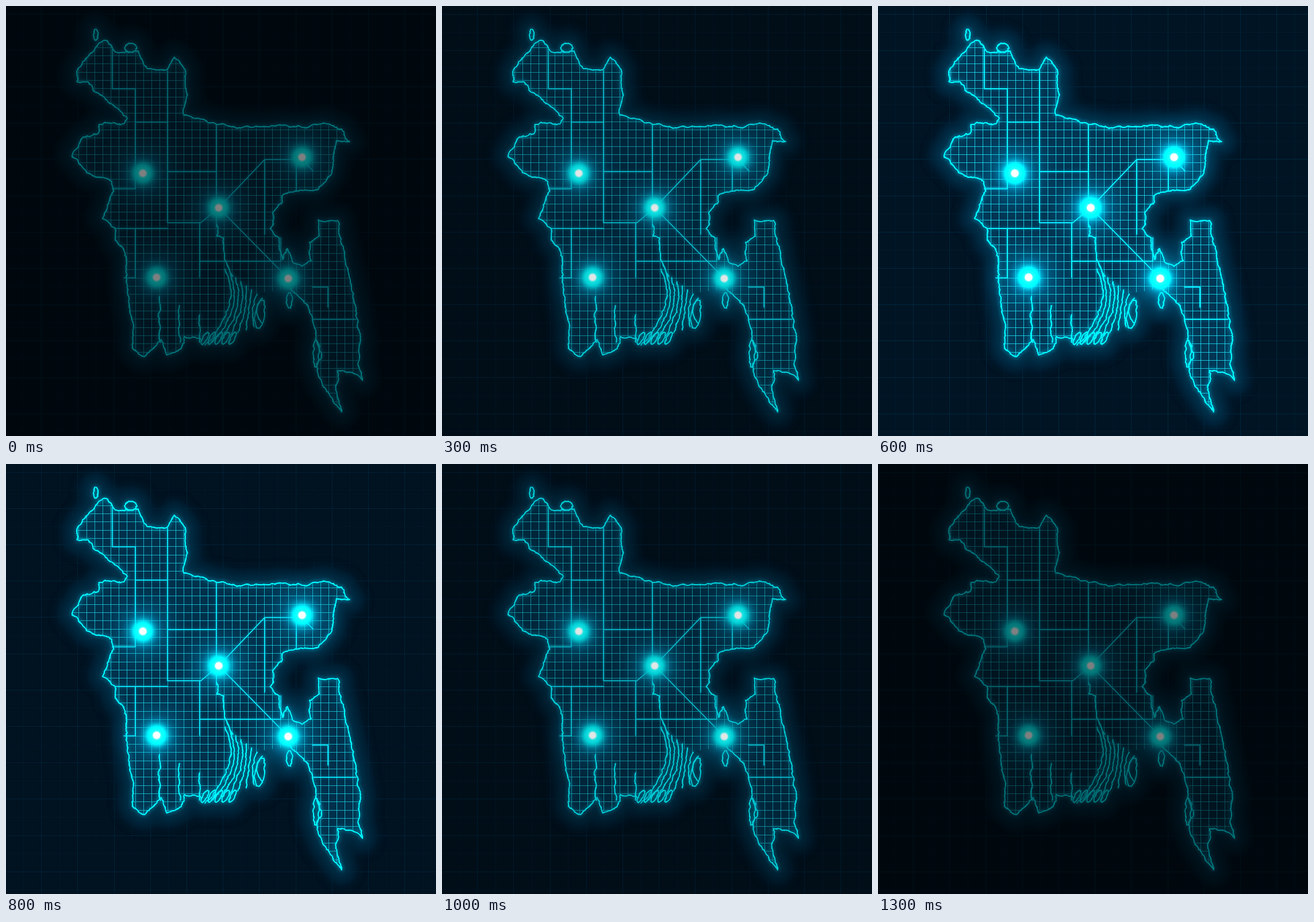
These frames come from a looping animation (748x748 px, 1.4 s). An HTML page with a canvas:

```html
<!DOCTYPE html>
<html lang="en">
<head>
<meta charset="utf-8">
<title>Glowing map</title>
<style>
  html, body { margin: 0; width: 100%; height: 100%; overflow: hidden; background: #000; }
  canvas { display: block; width: 748px; height: 748px; animation: pulse 1400ms infinite; }
  /* Six steps up, a short hold, six steps down */
  @keyframes pulse {
    0% { filter: brightness(.5); animation-timing-function: steps(6, end); }
    42.85% { filter: brightness(1.3); animation-timing-function: step-end; }
    57.14% { filter: brightness(1.3); animation-timing-function: steps(6, start); }
    100% { filter: brightness(.5); }
  }
</style>
</head>
<body>
<canvas id="map" width="748" height="748"></canvas>
<script>
const SIZE = 748;
const ctx = document.getElementById('map').getContext('2d');
const points = text => text.trim().split(/\s+/).map(p => p.split(',').map(Number));
const mix = (a, b, t) => a + (b - a) * t;

let seed = 7;
const random = () => (seed = seed * 16807 % 2147483647) / 2147483647;
const shake = amount => (random() - .5) * amount;

// Key points of the coast; the small bays come from roughen()
const east = points(`163,64 175,60 190,80 230,78 246,109 279,111 293,89 312,111 315,155 309,189
  366,206 425,211 500,210 560,205 584,214 598,236 575,234 567,290 543,319 503,322 482,328
  481,341 464,361 460,388 475,403 481,441 489,422 498,445 515,453 531,443 528,411 545,400
  543,372 577,373 588,425 604,500 617,580 613,625 620,651 606,640 577,634 576,680 584,706
  558,670 541,628 549,610 537,560 526,525 495,491`);
const shore = points('430,501 393,480 388,548 340,578');
const west = points(`340,580 310,575 305,596 280,607 270,580 262,590 241,610 222,598 221,550
  209,480 207,430 190,406 190,387 168,370 187,322 184,305 140,290 115,260 134,228 160,222
  162,206 205,205 211,195 186,172 152,147 143,132 124,132 124,112 145,84 163,64`);
const river = points('366,380 367,400 379,404 380,440 395,470');
const nodes = points('238,291 515,263 370,351 262,472 491,474');

const borders = new Path2D(`M185 76V144H225V318H185M281 112V377H339L370 351L450 267H515L534 287
  M366 206V385M281 288H366M225 202H281M505 267V322M450 267V397M190 387H281M337 377V472
  M337 444H478V403M370 351L491 474M205 473H225V387M533 489H560V524M533 545H609`);

// Midpoint displacement: halves each edge and pushes the middle sideways.
function roughen(list) {
  const out = [list[0]];
  const split = ([ax, ay], [bx, by]) => {
    const length = Math.hypot(bx - ax, by - ay);
    if (length < 5) return out.push([bx, by]);
    const push = shake(Math.min(5, length * .28)) / length;
    const mid = [(ax + bx) / 2 - (by - ay) * push, (ay + by) / 2 + (bx - ax) * push];
    split([ax, ay], mid);
    split(mid, [bx, by]);
  };
  for (let i = 1; i < list.length; i++) split(list[i - 1], list[i]);
  return out;
}

function trace(list, path = new Path2D()) {
  list.forEach(([x, y], i) => i ? path.lineTo(x, y) : path.moveTo(x, y));
  return path;
}

function oval(cx, cy, rx, ry, tilt = 0) {
  return Array.from({ length: 11 }, (_, i) => {
    const a = i * Math.PI / 5, x = rx * Math.cos(a), y = ry * Math.sin(a);
    return [cx + x * Math.cos(tilt) - y * Math.sin(tilt), cy + x * Math.sin(tilt) + y * Math.cos(tilt)];
  });
}

// One channel of the river fan: t = 0 is the western arm, t = 1 the eastern.
function strand(t) {
  const x0 = mix(381, 446, t), y0 = mix(458, 508, t);
  const x1 = mix(346, 446, t), y1 = mix(590, 552, t);
  const bow = mix(60, -25, t);
  return Array.from({ length: 9 }, (_, i) => {
    const s = i / 8;
    return [mix(x0, x1, s) + bow * s * (1 - s) * 1.6, mix(y0, y1, s)];
  });
}

function stroke(path, color, width, blur = 0) {
  ctx.filter = blur ? `blur(${blur}px)` : 'none';
  ctx.strokeStyle = color;
  ctx.lineWidth = width;
  ctx.stroke(path);
  ctx.filter = 'none';
}

function grid(x0, y0, dx, dy, color) {
  ctx.fillStyle = color;
  for (let x = x0; x < SIZE; x += dx) ctx.fillRect(Math.floor(x), 0, 1, SIZE);
  for (let y = y0; y < SIZE; y += dy) ctx.fillRect(0, Math.floor(y), SIZE, 1);
}

function glow([x, y], r, stops) {
  const fill = ctx.createRadialGradient(x, y, 0, x, y, r);
  stops.forEach(([d, c]) => fill.addColorStop(d / r, `rgba(${c})`));
  ctx.fillStyle = fill;
  ctx.fillRect(x - r, y - r, 2 * r, 2 * r);
}

function sketch(line) {
  stroke(trace(line), 'rgba(0,150,180,.5)', 5, 3);
  stroke(trace(line), 'rgb(0,245,253)', 1.6);
  stroke(trace(line.map(([x, y]) => [x + shake(2.6), y + shake(2.6)])), 'rgba(0,235,245,.85)', 1.1);
}

const coast = [east, west].map(roughen);
const land = trace([...coast[0], ...shore, ...coast[1]]);
land.closePath();

const water = [river, oval(156, 50, 4, 10), oval(217, 73, 11, 8), oval(493, 512, 5, 14),
  oval(539, 605, 5, 24), oval(442, 536, 8, 26, .15)];
for (let i = 0; i < 8; i++) water.push(strand(i / 7));
for (let i = 0; i < 5; i++) water.push(oval(346 + 12 * i, 578, 4, 12, .5));
for (let i = 0; i < 3; i++) water.push([[267 + 35 * i, 505 + 16 * i], [269 + 34 * i, 585]]);
const channels = water.map(roughen);

ctx.lineJoin = ctx.lineCap = 'round';
ctx.fillStyle = '#010f1b';
ctx.fillRect(0, 0, SIZE, SIZE);
grid(-1.5, 14, 31.6, 31.6, 'rgba(0,70,105,.1)');
grid(-1.5, 14, 63.2, 63.2, 'rgba(0,80,115,.17)');

// Halo around the coast
const rim = new Path2D(land);
channels.forEach(c => trace(c, rim));
stroke(rim, 'rgba(2,32,51,.8)', 56, 7);
stroke(rim, 'rgba(2,52,76,.6)', 24, 8);
ctx.fillStyle = '#022940';
ctx.fill(land);

// Wide blue haze below the grid
nodes.forEach(n => glow(n, 80, [[0, '0,125,165,.6'], [30, '0,115,155,.42'], [55, '0,95,135,.16'], [80, '0,80,120,0']]));

ctx.save();
ctx.clip(land);
stroke(land, 'rgba(0,70,95,.4)', 16, 7);
grid(225 - 14.03 * 8, 330 - 14.32 * 21, 14.03, 14.32, 'rgba(25,180,195,.78)');
ctx.restore();

stroke(borders, 'rgba(0,150,180,.35)', 4, 2);
stroke(borders, 'rgb(10,215,230)', 1.6);
[...coast, ...channels].forEach(sketch);

nodes.forEach(n => glow(n, 38, [[0, '255,255,255,1'], [5, '245,255,255,1'], [8, '30,250,250,1'],
  [14, '0,235,240,.97'], [18, '0,215,228,.76'], [23, '0,185,210,.42'], [30, '0,150,190,.14'], [38, '0,130,170,0']]));
</script>
</body>
</html>
```
